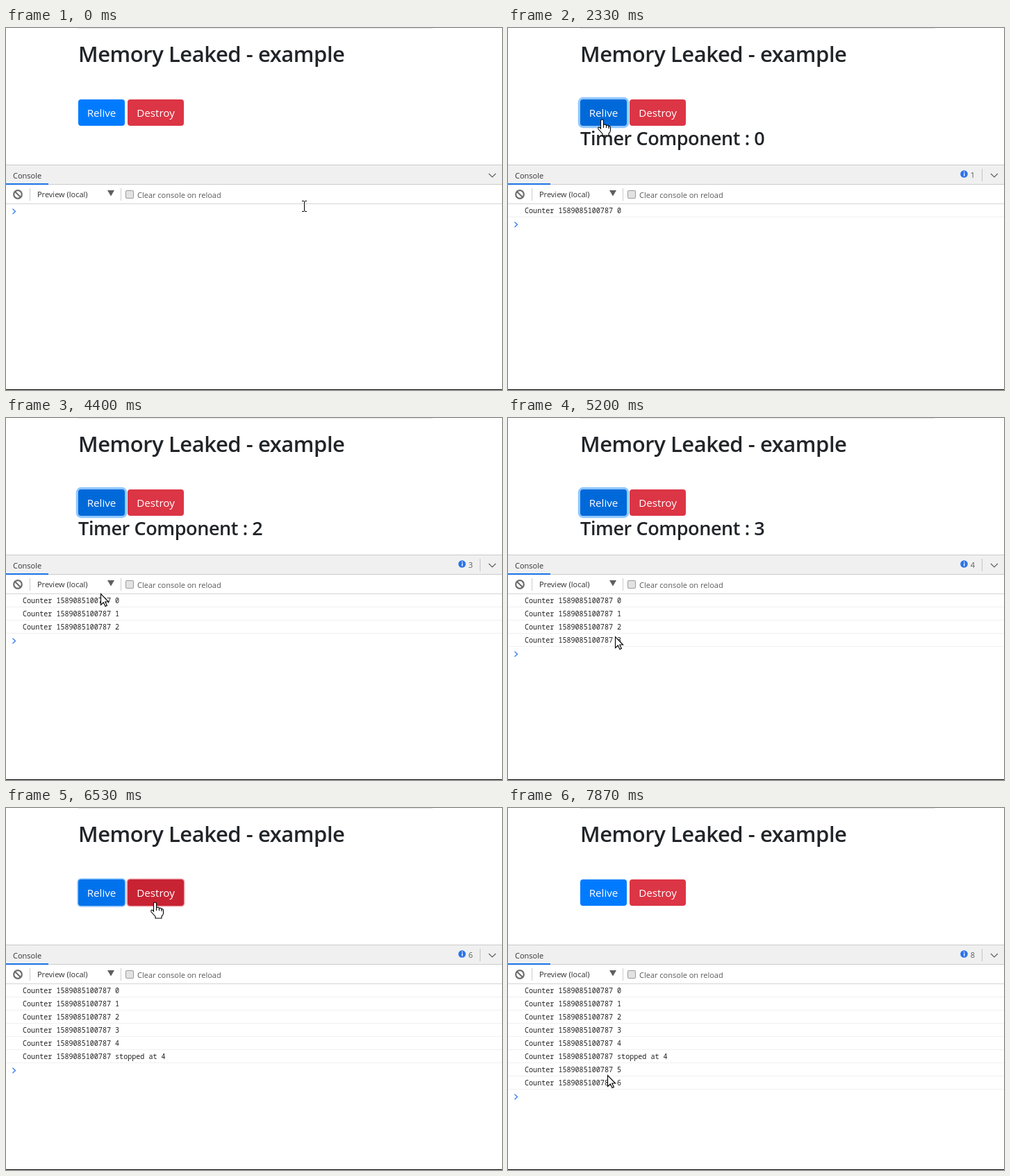
An HTML page with a canvas that plays this animation: 714x522 px, repeating every 8 s.

```html
<!DOCTYPE html>
<html lang="en">
<head>
<meta charset="utf-8">
<title>Memory Leaked - example</title>
<style>
html, body { margin: 0; width: 714px; height: 522px; overflow: hidden; background: #fff; }
canvas { display: block; }
</style>
</head>
<body>
<canvas id="stage" width="714" height="522"></canvas>
<script>
const ctx = document.getElementById('stage').getContext('2d');
const LOOP = 8000, STEP = 1000 / 15, ROW = 19;
const SANS = '"Open Sans", "Noto Sans", sans-serif';
const MONO = '"Noto Sans Mono", "DejaVu Sans Mono", monospace';

// Console messages: [time, text]
const ticks = [0, 1, 2, 3, 4, 5, 6].map(n => [1660 + n * 1000, n]);
const logs = [...ticks, [6530, 'stopped at 4']].sort((a, b) => a[0] - b[0]);

// Pointer moves: [start, end, x, y]
const moves = [
  [0, 870, 129, 177], [870, 1270, 122, 135], [2270, 2670, 308, 90],
  [3130, 3200, 307, 92], [3200, 4000, 153, 299], [4070, 4130, 149, 299],
  [4200, 4400, 136, 253], [4400, 4870, 142, 178], [5000, 5270, 157, 343],
  [5400, 6000, 214, 142], [6000, 6200, 214, 136], [6600, 7000, 196, 377],
  [7130, 7200, 196, 362], [7200, 7270, 197, 352], [7400, 7670, 170, 416],
  [7670, 7870, 143, 385]
];

const buttons = [
  { label: 'Relive', x: 104, w: 67, base: [0, 123, 255], dark: [0, 105, 217],
    ring: '38,143,255', shade: [1190, 6460], focus: [1590, 6460] },
  { label: 'Destroy', x: 175, w: 81, base: [220, 53, 69], dark: [200, 35, 51],
    ring: '225,83,97', shade: [6060, 7660], focus: [6460, 7660] }
];

const arrow = new Path2D('M.5 .5V16.5L4.3 13L7 18.6L9.4 17.5L6.8 12H11.6Z');
const hand = new Path2D('M-1.5 12V2Q-1.5 0 .5 0T2.5 2V7.5Q6 6.5 6.5 8.5Q9.5 7.5 10 9.8' +
  'Q12.5 9 12.5 12V16Q12 19 10 20V23H1V20.5L-4.8 14Q-6 11.5 -4 11Q-2.8 11 -1.5 13Z');
const fingers = new Path2D('M2.5 7.5V12M6.5 8.5V12M10 9.8V13');

const ease = u => { u = Math.min(1, Math.max(0, u)); return u * u * (3 - 2 * u); };
const fade = (t, [on, off]) => ease((t - on) / 150) - ease((t - off) / 150);

function rect(color, x, y, w, h) {
  ctx.fillStyle = color;
  ctx.fillRect(x, y, w, h);
}

function text(str, x, y, font, color, align = 'left', spacing = 0) {
  ctx.font = font;
  ctx.fillStyle = color;
  ctx.textAlign = align;
  ctx.letterSpacing = spacing + 'px';
  ctx.fillText(str, x, y);
}

function line(color, width, ...points) {
  ctx.strokeStyle = color;
  ctx.lineWidth = width;
  ctx.beginPath();
  points.forEach(([x, y]) => ctx.lineTo(x, y));
  ctx.stroke();
}

function disc(color, x, y, r) {
  ctx.fillStyle = color;
  ctx.beginPath();
  ctx.arc(x, y, r, 0, 7);
  ctx.fill();
}

function rounded(color, x, y, w, h, r) {
  ctx.fillStyle = color;
  ctx.beginPath();
  ctx.roundRect(x, y, w, h, r);
  ctx.fill();
}

function drawButton(b, t) {
  const focus = fade(t, b.focus), shade = fade(t, b.shade);
  if (focus > 0) {
    const s = 3.2 * focus;
    rounded(`rgba(${b.ring},.5)`, b.x - s, 103 - s, b.w + 2 * s, 38 + 2 * s, 4 + s);
  }
  const mix = b.base.map((c, i) => Math.round(c + (b.dark[i] - c) * shade));
  rounded(`rgb(${mix})`, b.x, 103, b.w, 38, 4);
  text(b.label, b.x + b.w / 2, 128, '15.2px ' + SANS, '#fff', 'center');
}

function drawPage(t, count) {
  rect('#e5e5e5', 104, 0, 510, 1);
  text('Memory Leaked - example', 104, 49, '600 31px ' + SANS, '#212529', 'left', -0.45);
  buttons.forEach(b => drawButton(b, t));
  if (count >= 0) {
    text('Timer Component : ' + count, 104, 169, '600 27px ' + SANS, '#212529', 'left', -0.4);
  }
}

function drawToolbar(total) {
  const small = '11px ' + SANS;
  rect('#f0f0f0', 0, 197, 714, 29);
  rect('#cacaca', 0, 197, 714, 1);
  rect('#cccccc', 0, 225, 714, 1);
  rect('#1a73e8', 0, 224, 61, 2);
  text('Console', 10, 217, small, '#333');
  line('#5a5a5a', 1.1, [695, 210], [700, 215], [705, 210]);
  if (total) {
    disc('#2b74e8', 656.5, 210.5, 5.3);
    rect('#fff', 656, 207, 1.4, 1.4);
    rect('#fff', 656, 209.5, 1.4, 4);
    text(total, 672, 216, small, '#5a5a5a', 'right');
    rect('#c4c4c4', 682, 203, 1, 18);
  }

  ctx.strokeStyle = '#6e6e6e';
  ctx.lineWidth = 2.2;
  ctx.beginPath();
  ctx.arc(17, 240, 5.8, 0, 7);
  ctx.stroke();
  line('#6e6e6e', 2.2, [13, 236], [21, 244]);
  rect('#cccccc', 34, 231, 1, 18);
  rect('#cccccc', 165, 231, 1, 18);
  text('Preview (local)', 45, 244, small, '#303030');
  ctx.fillStyle = '#5f5f5f';
  ctx.fill(new Path2D('M146 234H156L151 242.5Z'));
  rounded('#9c9c9c', 172, 234, 12, 12, 2);
  rounded('#e2e2e2', 173, 235, 10, 10, 1);
  text('Clear console on reload', 189, 245, small, '#5a5a5a');
  rect('#d5d5d5', 0, 253, 714, 1);
}

function drawLogs(shown) {
  shown.forEach(([, msg], i) => {
    text('Counter 1589085100787 ' + msg, 24, 267 + i * ROW, '10.08px ' + MONO, '#202020');
    rect('#f0f0f0', 0, 272 + i * ROW, 714, 1);
  });
  const y = 264.5 + shown.length * ROW;
  line('#367cf1', 1.3, [9.5, y - 3.8], [13.5, y], [9.5, y + 3.8]);
  rect('#000', 0, 521, 714, 1);
}

function pointerAt(t) {
  let x = 429, y = 257;
  for (const [from, to, tx, ty] of moves) {
    if (t <= from) break;
    const u = ease((t - from) / (to - from));
    x += (tx - x) * u;
    y += (ty - y) * u;
  }
  return [Math.round(x), Math.round(y)];
}

function drawPointer(t, rows, timerShown) {
  const [x, y] = pointerAt(t);
  const onButton = y >= 103 && y <= 141 && buttons.some(b => x >= b.x && x < b.x + b.w);
  const onHeading = timerShown && y > 141 && y < 175 && x >= 104 && x < 614;
  const onPrompt = y >= 254 + rows * ROW;
  ctx.save();
  ctx.translate(x, y);
  if (onHeading || onPrompt) {
    ctx.globalCompositeOperation = 'difference';
    rect('#fff', 0, -7, 1, 14);
    for (const sy of [-8, 7]) for (const sx of [-3, 1]) rect('#fff', sx, sy, 3, 1);
  } else {
    const shape = onButton ? hand : arrow;
    ctx.fillStyle = '#fff';
    ctx.strokeStyle = '#000';
    ctx.lineWidth = 1.1;
    ctx.fill(shape);
    ctx.stroke(shape);
    if (onButton) ctx.stroke(fingers);
  }
  ctx.restore();
}

function draw(now) {
  const t = Math.floor((now % LOOP + 4) / STEP) * STEP;
  const shown = logs.filter(([at]) => t >= at);
  const timerShown = shown.length > 0 && t < 6530;
  rect('#fff', 0, 0, 714, 522);
  drawPage(t, timerShown ? shown.length - 1 : -1);
  drawToolbar(shown.length);
  drawLogs(shown);
  drawPointer(t, shown.length, timerShown);
}

let start;
function frame(now) {
  start ??= now;
  draw(now - start);
  requestAnimationFrame(frame);
}
requestAnimationFrame(frame);
</script>
</body>
</html>
```
